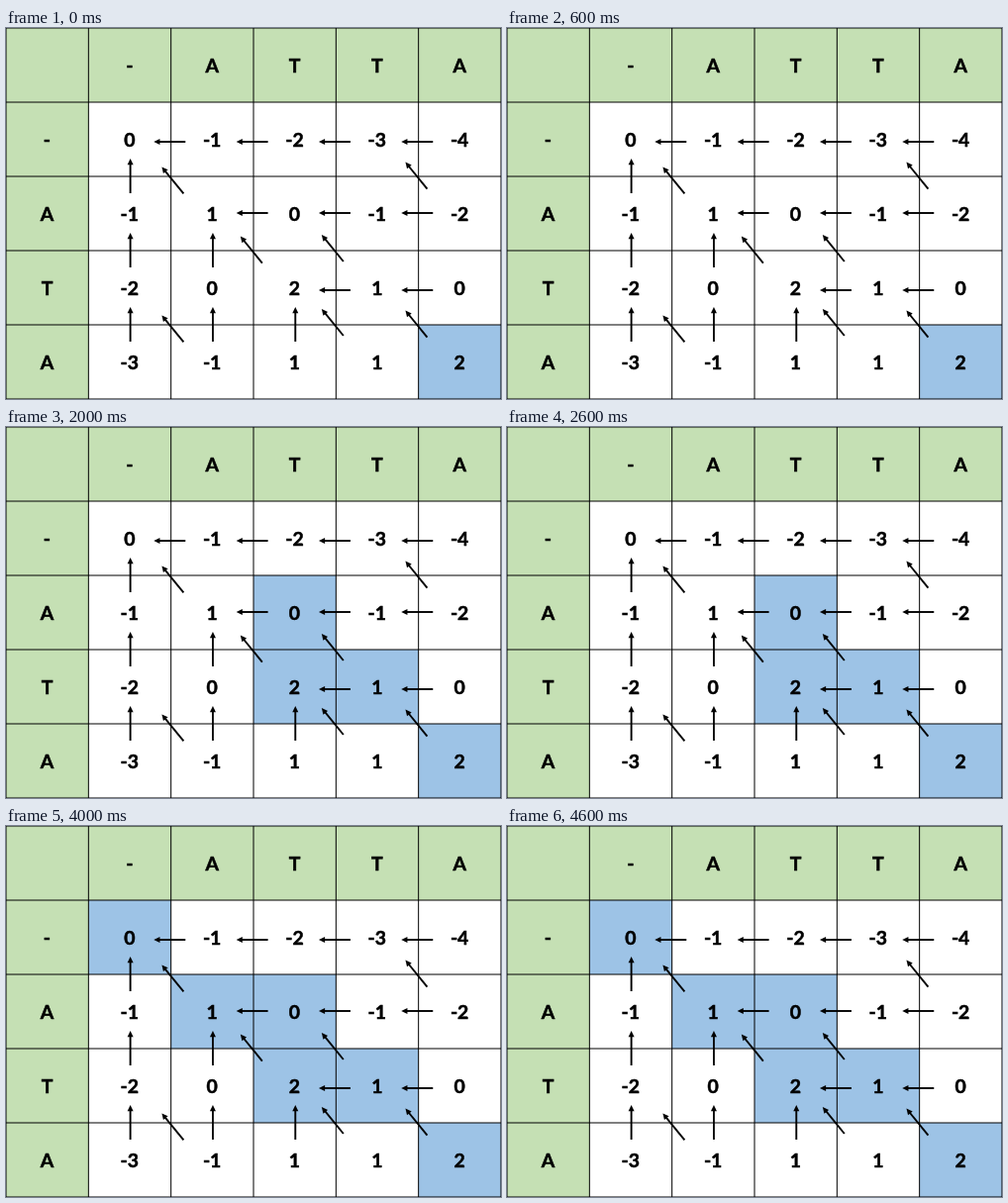
An HTML page for the animation above (5000 ms loop, 500x375 px).

```html
<!DOCTYPE html>
<html lang="en">
<head>
<meta charset="utf-8">
<title>Alignment traceback</title>
<style>
  html, body { margin: 0; width: 100%; height: 100%; overflow: hidden; background: #fff; }
  svg { display: block; width: 500px; height: 375px; }
  text { font: 700 19.4px Lato, "Open Sans", sans-serif; text-anchor: middle; stroke: #000; stroke-width: 0.5; }
  .head { fill: #c5e0b4; }
  .path { fill: #9dc3e6; }
  .grid { stroke: #000; stroke-width: 1; }
  .arrow line { stroke: #000; stroke-width: 1.9; }
</style>
</head>
<body>
<svg id="stage" viewBox="0 0 500 375"></svg>
<script>
const stage = document.getElementById('stage');
const across = '-ATTA', down = '-ATA';
const COLS = across.length + 1, ROWS = down.length + 1;
const CELL_W = 500 / COLS, CELL_H = 375 / ROWS, STEP_MS = 1000;

// Each kind of move: its cell offset, arrow vector and tail position inside the cell.
const moves = {
  left: { dc: -1, dr: 0, dx: -32, dy: 0,
    tail: (col, row) => [14.6, 37 + 3 * (row % 2)] },
  up: { dc: 0, dr: -1, dx: 0, dy: -35,
    tail: () => [CELL_W / 2 + 0.6, 17] },
  diagonal: { dc: -1, dr: -1, dx: -22, dy: -27,
    tail: col => [7.5 + 1.3 * (col - 4) ** 2, 11 + 1.6 * (col - 4) ** 2] }
};

// Global alignment: a match scores 1, a mismatch or gap -1.
function align() {
  const table = [];
  for (let row = 1; row < ROWS; row++) {
    table[row] = [];
    for (let col = 1; col < COLS; col++) {
      const same = across[col - 1] === down[row - 1];
      const options = Object.values(moves).flatMap(move => {
        const from = table[row + move.dr]?.[col + move.dc];
        const gain = move === moves.diagonal && same ? 1 : -1;
        return from ? [{ move, score: from.score + gain }] : [];
      });
      const score = options.length ? Math.max(...options.map(o => o.score)) : 0;
      const best = options.filter(o => o.score === score).map(o => o.move);
      table[row][col] = { col, row, score, best };
    }
  }
  return table;
}

// All best paths back from the last cell, one set of cells per step.
function traceBack(table) {
  const steps = [];
  let front = new Set([table[ROWS - 1][COLS - 1]]);
  while (front.size) {
    const cells = [...front];
    steps.push(cells);
    front = new Set(cells.flatMap(({ col, row, best }) =>
      best.map(move => table[row + move.dr][col + move.dc])));
  }
  return steps;
}

function add(parent, tag, attrs, content = '') {
  const node = document.createElementNS('http://www.w3.org/2000/svg', tag);
  for (const key in attrs) node.setAttribute(key, attrs[key]);
  node.textContent = content;
  return parent.appendChild(node);
}

function addBlock(parent, col, row, cls, cols = 1, rows = 1) {
  add(parent, 'rect', { x: col * CELL_W, y: row * CELL_H,
    width: cols * CELL_W, height: rows * CELL_H, class: cls });
}

function addLabel(col, row, label) {
  add(stage, 'text', { x: (col + 0.5) * CELL_W - 0.2, y: row * CELL_H + 45 }, label);
}

function addArrow({ col, row }, { dx, dy, tail }) {
  const [x, y] = tail(col, row);
  const length = Math.hypot(dx, dy);
  const angle = Math.atan2(dy, dx) * 180 / Math.PI;
  const group = add(stage, 'g', { class: 'arrow',
    transform: `translate(${col * CELL_W + x} ${row * CELL_H + y}) rotate(${angle})` });
  add(group, 'line', { x1: 0, x2: length - 5, y1: 0, y2: 0 });
  add(group, 'path', { d: `M${length} 0l-6.2 -3v6z` });
}

const table = align();

addBlock(stage, 0, 0, 'head', COLS, 1);
addBlock(stage, 0, 0, 'head', 1, ROWS);

const layers = traceBack(table).map(cells => {
  const layer = add(stage, 'g', {});
  cells.forEach(({ col, row }) => addBlock(layer, col, row, 'path'));
  return layer;
});

for (let col = 0; col <= COLS; col++) {
  const x = col * CELL_W;
  add(stage, 'line', { x1: x, x2: x, y1: 0, y2: 375, class: 'grid' });
}
for (let row = 0; row <= ROWS; row++) {
  const y = row * CELL_H;
  add(stage, 'line', { x1: 0, x2: 500, y1: y, y2: y, class: 'grid' });
}

[...across].forEach((letter, i) => addLabel(i + 1, 0, letter));
[...down].forEach((letter, i) => addLabel(0, i + 1, letter));

table.flat().forEach(cell => {
  addLabel(cell.col, cell.row, cell.score);
  cell.best.forEach(move => addArrow(cell, move));
});

function render(ms) {
  const step = Math.floor(ms / STEP_MS) % layers.length;
  layers.forEach((layer, i) => layer.setAttribute('visibility', i <= step ? 'visible' : 'hidden'));
}

let start;
function tick(now) {
  start ??= now;
  render(now - start);
  requestAnimationFrame(tick);
}
render(0);
requestAnimationFrame(tick);
</script>
</body>
</html>
```
